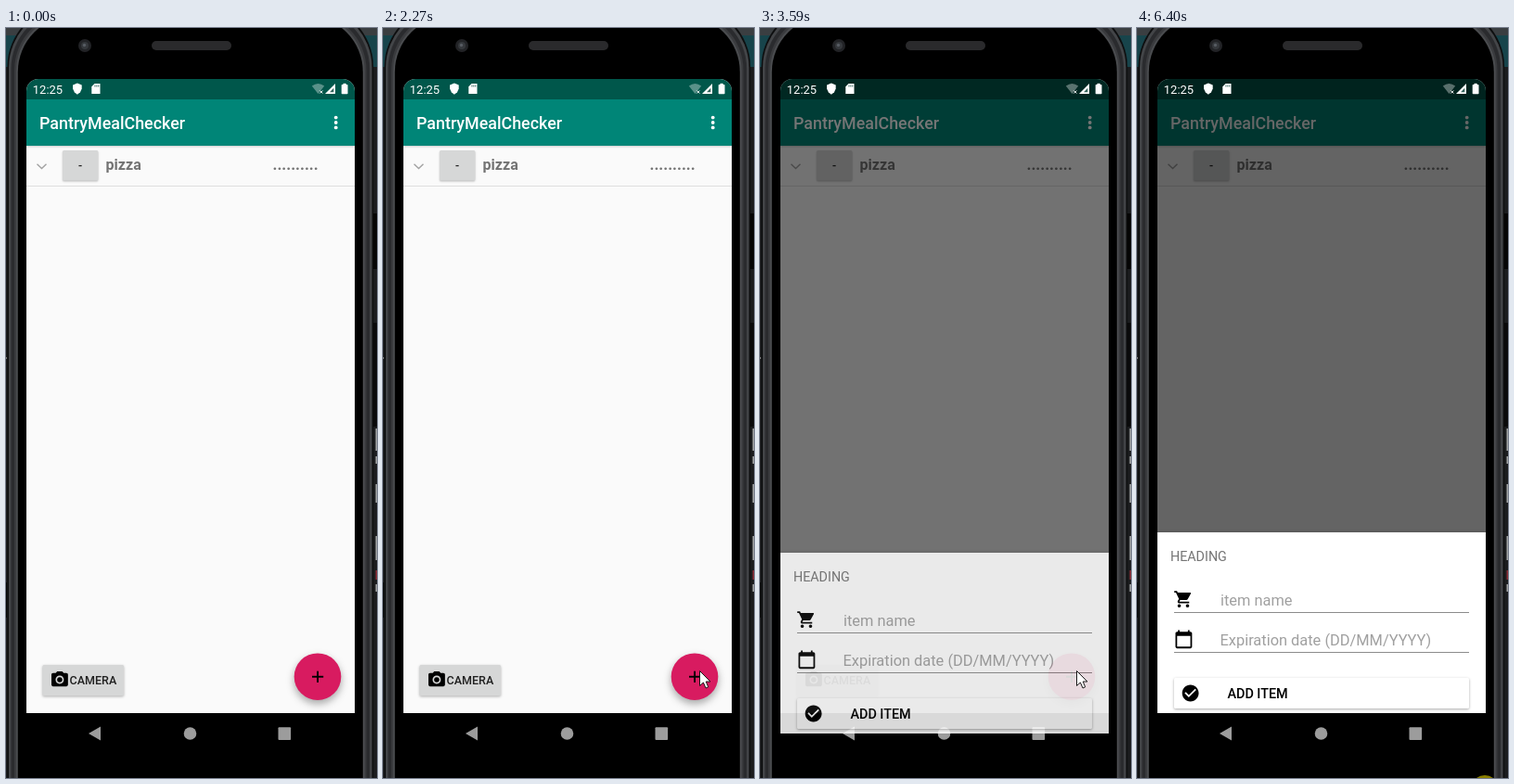
Animation, 400 px wide and 809 px high, one loop 6.64 s. Source, as an HTML page with a canvas:

```html
<!DOCTYPE html>
<html lang="en">
<head>
<meta charset="utf-8">
<title>Pantry app demo</title>
<style>
  html, body { margin: 0; width: 100%; height: 100%; overflow: hidden; background: #17181a; }
  canvas { display: block; width: 400px; height: 809px; }
</style>
</head>
<body>
<canvas id="stage" width="400" height="809"></canvas>
<script>
const W = 400, H = 809, LOOP = 6640;
const stage = document.getElementById('stage').getContext('2d');

// Material icons on a 24 unit grid
const ICONS = {
  camera: new Path2D('M9 2L7.17 4H4c-1.1 0-2 .9-2 2v12c0 1.1.9 2 2 2h16c1.1 0 2-.9 2-2V6c0-1.1-.9-2-2-2h-3.17L15 2H9zm3 15c-2.76 0-5-2.24-5-5s2.24-5 5-5 5 2.24 5 5-2.24 5-5 5zM12 8.8a3.2 3.2 0 1 0 .01 0z'),
  cart: new Path2D('M7 18c-1.1 0-1.99.9-1.99 2S5.9 22 7 22s2-.9 2-2-.9-2-2-2zM1 2v2h2l3.6 7.59-1.35 2.45c-.16.28-.25.61-.25.96 0 1.1.9 2 2 2h12v-2H7.42c-.14 0-.25-.11-.25-.25l.03-.12.9-1.63h7.45c.75 0 1.41-.41 1.75-1.03l3.58-6.49A1 1 0 0 0 20 4H5.21l-.94-2H1zm16 16c-1.1 0-1.99.9-1.99 2s.89 2 1.99 2 2-.9 2-2-.9-2-2-2z'),
  calendar: new Path2D('M20 3h-1V1h-2v2H7V1H5v2H4c-1.1 0-2 .9-2 2v16c0 1.1.9 2 2 2h16c1.1 0 2-.9 2-2V5c0-1.1-.9-2-2-2zm0 18H4V8h16v13z'),
  check: new Path2D('M12 2C6.48 2 2 6.48 2 12s4.48 10 10 10 10-4.48 10-10S17.52 2 12 2zm-2 15l-5-5 1.41-1.41L10 14.17l7.59-7.59L19 8l-9 9z')
};
const POINTER = new Path2D('M0 0V16L3.9 12.5L6.5 18.5L9.2 17.3L6.7 11.5H11.5Z');

const ENTER = [[275, 763], [277, 745], [283, 724], [291, 705], [300, 691], [309, 684], [318, 681], [327, 684], [334, 691]];
const LEAVE = [[302.5, 689.5], [268, 696], [251, 720], [250, 757], [262, 794]];
const REST = [341.5, 693.5];
const FAB = { x: 336, y: 699.7, r: 25.3 };

function layer() {
  const c = document.createElement('canvas');
  c.width = W;
  c.height = H;
  return c.getContext('2d');
}

function rect(g, x, y, w, h, color) {
  g.fillStyle = color;
  g.fillRect(x, y, w, h);
}

function round(g, x, y, w, h, r, color) {
  g.beginPath();
  g.roundRect(x, y, w, h, r);
  g.fillStyle = color;
  g.fill();
}

function disc(g, x, y, r, color) {
  g.beginPath();
  g.arc(x, y, r, 0, Math.PI * 2);
  g.fillStyle = color;
  g.fill();
}

function poly(g, pts, color) {
  g.beginPath();
  pts.forEach(([x, y]) => g.lineTo(x, y));
  g.closePath();
  g.fillStyle = color;
  g.fill();
}

function text(g, str, x, y, size, weight, color) {
  g.font = `${weight} ${size}px Roboto, sans-serif`;
  g.fillStyle = color;
  g.fillText(str, x, y);
}

function icon(g, name, x, y) {
  g.save();
  g.translate(x, y);
  g.scale(0.893, 0.893);
  g.fillStyle = '#000';
  g.fill(ICONS[name], 'evenodd');
  g.restore();
}

function shadowed(g, blur, dy, alpha, draw) {
  g.save();
  g.shadowColor = `rgba(0,0,0,${alpha})`;
  g.shadowBlur = blur;
  g.shadowOffsetY = dy;
  draw();
  g.restore();
}

function clipScreen(g, bottom) {
  const low = bottom > 739 ? 13 : 0;
  g.beginPath();
  g.roundRect(22, 55, 354, bottom - 55, [13, 13, low, low]);
  g.clip();
}

function drawPhone(g) {
  rect(g, 0, 0, W, H, '#1b1c1e');
  rect(g, 0, 0, W, 8, '#3a3e41');
  rect(g, 0, 8, W, 34, '#17444b');
  rect(g, 396, 200, 4, 60, '#050505');
  rect(g, 396, 318, 4, 112, '#0a0a0b');
  [[432, 24], [462, 8], [492, 20], [548, 26], [600, 8]]
    .forEach(([y, h]) => rect(g, 398.5, y, 1.5, h, '#a3a5a6'));
  rect(g, 398.5, 585, 1.5, 10, '#8a2a34');
  rect(g, 0, 355, 1, 2, '#777');
  rect(g, 0, 598, 1, 38, '#050505');
  // Nested rims from the outside in
  [[1.5, '#0d0e0f'], [3, '#434548'], [5.5, '#2a2b2e'], [9, '#3a3b3e'], [11, '#4a4c4f'], [12.8, '#000']]
    .forEach(([x, c]) => round(g, x, x - 26, 2 * (198.8 - x), 900, 67 - x / 2, c));
  round(g, 157, 14, 86, 10, 5, '#2a2a2c');
  disc(g, 85, 19, 7, '#222326');
  disc(g, 85, 19, 4, '#35383c');
  disc(g, 84.5, 18.5, 1.7, '#565b62');
}

function drawNav(g) {
  const c = '#9c9c9c';
  poly(g, [[89, 761], [102, 753.5], [102, 768.5]], c);
  disc(g, 198.5, 761, 6.8, c);
  round(g, 293.5, 754.3, 13.6, 13.6, 1, c);
}

function drawApp(g) {
  g.save();
  clipScreen(g, 739);
  rect(g, 22, 55, 354, 684, '#fafafa');
  shadowed(g, 2, 0.5, 0.2, () => rect(g, 22, 76, 354, 51, '#008577'));
  rect(g, 22, 55, 354, 22, '#00574b');
  text(g, 'PantryMealChecker', 36, 109, 17.86, 500, '#fff');
  [96.6, 102, 107.4].forEach(y => disc(g, 355.7, y, 1.9, '#fff'));

  g.strokeStyle = '#a2a2a2';
  g.lineWidth = 1.4;
  g.beginPath();
  g.moveTo(33.5, 146.8);
  g.lineTo(38.5, 151.5);
  g.lineTo(43.5, 146.8);
  g.stroke();
  shadowed(g, 2, 1, 0.25, () => round(g, 61, 132, 38.3, 32.5, 1.5, '#d6d7d7'));
  text(g, '-', 78, 152.5, 12.5, 500, '#222');
  text(g, 'pizza', 107.5, 153.2, 16.07, 700, '#737373');
  text(g, '..........', 287.5, 153.2, 16.9, 700, '#737373');
  rect(g, 22, 170, 354, 1, '#dedede');

  shadowed(g, 3, 1, 0.3, () => round(g, 39.5, 687, 87.5, 33.2, 1.5, '#d6d7d7'));
  icon(g, 'camera', 47.2, 692.3);
  text(g, 'CAMERA', 68.6, 708, 12.5, 500, '#212121');
  shadowed(g, 8, 4, 0.34, () => disc(g, FAB.x, FAB.y, FAB.r, '#d81b60'));
  rect(g, 330, 698.8, 12.2, 1.9, '#000');
  rect(g, 335.1, 693.7, 1.9, 12.2, '#000');
  g.restore();
}

function drawStatus(g) {
  text(g, '12:25', 28.8, 70.5, 13, 400, '#fff');
  poly(g, [[76.9, 59.5], [81.7, 61.5], [81.7, 65.5], [80, 69.3], [76.9, 71.7], [73.8, 69.3], [72.1, 65.5], [72.1, 61.5]], '#fff');
  poly(g, [[95.5, 60], [101.5, 60], [101.5, 71], [92.3, 71], [92.3, 63.2]], '#fff');
  const hole = 'rgba(0,60,50,.8)';
  [95.5, 97.4, 99.3].forEach(x => rect(g, x, 61.5, 0.9, 2, hole));
  g.beginPath();
  g.moveTo(336.5, 71);
  g.lineTo(329.8, 62.5);
  g.quadraticCurveTo(336.5, 57.5, 343.2, 62.5);
  g.closePath();
  g.fillStyle = 'rgba(255,255,255,.35)';
  g.fill();
  g.strokeStyle = '#fff';
  g.lineWidth = 1;
  g.beginPath();
  g.moveTo(338.3, 67.5);
  g.lineTo(341.3, 70.5);
  g.moveTo(341.3, 67.5);
  g.lineTo(338.3, 70.5);
  g.stroke();
  poly(g, [[355, 60], [355, 71], [344, 71]], '#fff');
  poly(g, [[353.3, 64.8], [353.3, 69.2], [349, 69.2]], hole);
  round(g, 361.7, 61, 6.8, 10.2, 0.8, '#fff');
  rect(g, 363.5, 59.8, 3.2, 1.5, '#fff');
}

function drawSheet(g) {
  shadowed(g, 3, -1, 0.15, () => rect(g, 22, 544, 354, 195, '#fff'));
  text(g, 'HEADING', 36, 575, 14.29, 400, '#757575');
  icon(g, 'cart', 39.3, 605.4);
  text(g, 'item name', 90, 622.5, 16.4, 400, '#a0a0a0');
  rect(g, 40, 630, 318, 1, '#8b8b8b');
  icon(g, 'calendar', 39.7, 648.6);
  text(g, 'Expiration date (DD/MM/YYYY)', 89.5, 665.7, 16.4, 400, '#a0a0a0');
  rect(g, 40, 673, 318, 1, '#8b8b8b');
  shadowed(g, 3, 1, 0.35, () => round(g, 40, 701, 318, 33, 1.5, '#fff'));
  icon(g, 'check', 46.9, 706.8);
  text(g, 'ADD ITEM', 97.4, 723, 14.4, 500, '#000');
}

function prerender(...parts) {
  const g = layer();
  parts.forEach(p => p(g));
  return g.canvas;
}

const base = prerender(drawPhone, drawNav, drawApp);
const sheet = prerender(drawSheet);

function pointerAt(t) {
  if (t < 420) return null;
  if (t < 1110) return ENTER[Math.min(8, Math.floor((t - 420) / 76.25))];
  if (t < 4990) return REST;
  return LEAVE[Math.floor((t - 4990) / 84)] || null;
}

// [sheet progress, backdrop opacity]
function sheetAt(t) {
  if (t < 3510) return [0, 0];
  if (t < 3590) return [0.405, 0.32];
  if (t < 3660) return [0.85, 0.54];
  return [1, 0.6];
}

function drawRipple(g, t) {
  if (t < 1950 || t >= 2270) return;
  const step = Math.floor((t - 1950) / 80);
  g.save();
  g.beginPath();
  g.arc(FAB.x, FAB.y, FAB.r, 0, Math.PI * 2);
  g.clip();
  disc(g, FAB.x, FAB.y, 14 + step * 7, `rgba(0,0,0,${0.13 - step * 0.03})`);
  g.restore();
}

function drawPointer(g, [x, y]) {
  g.save();
  g.translate(x, y);
  g.fillStyle = '#fff';
  g.fill(POINTER);
  g.strokeStyle = '#1a1a1a';
  g.lineWidth = 1;
  g.stroke(POINTER);
  g.restore();
}

function render(t) {
  const g = stage;
  g.drawImage(base, 0, 0);
  drawRipple(g, t);

  const [p, dim] = sheetAt(t);
  if (p > 0) {
    g.save();
    clipScreen(g, 739);
    rect(g, 22, 55, 354, 684, `rgba(0,0,0,${dim})`);
    g.restore();
    g.save();
    clipScreen(g, 783);
    g.globalAlpha = p;
    g.drawImage(sheet, 0, Math.round(146 * (1 - p)));
    g.restore();
  }
  drawStatus(g);

  const pos = pointerAt(t);
  if (pos) drawPointer(g, pos);
  const press = 'rgba(255,235,0,.54)';
  if (t >= 1720 && t < 1950) disc(g, 341, 693, 15, press);
  if (t >= 6400) disc(g, 375, 821, 15, press);
}

const start = performance.now();
function tick() {
  render((performance.now() - start) % LOOP);
  requestAnimationFrame(tick);
}
tick();
</script>
</body>
</html>
```
